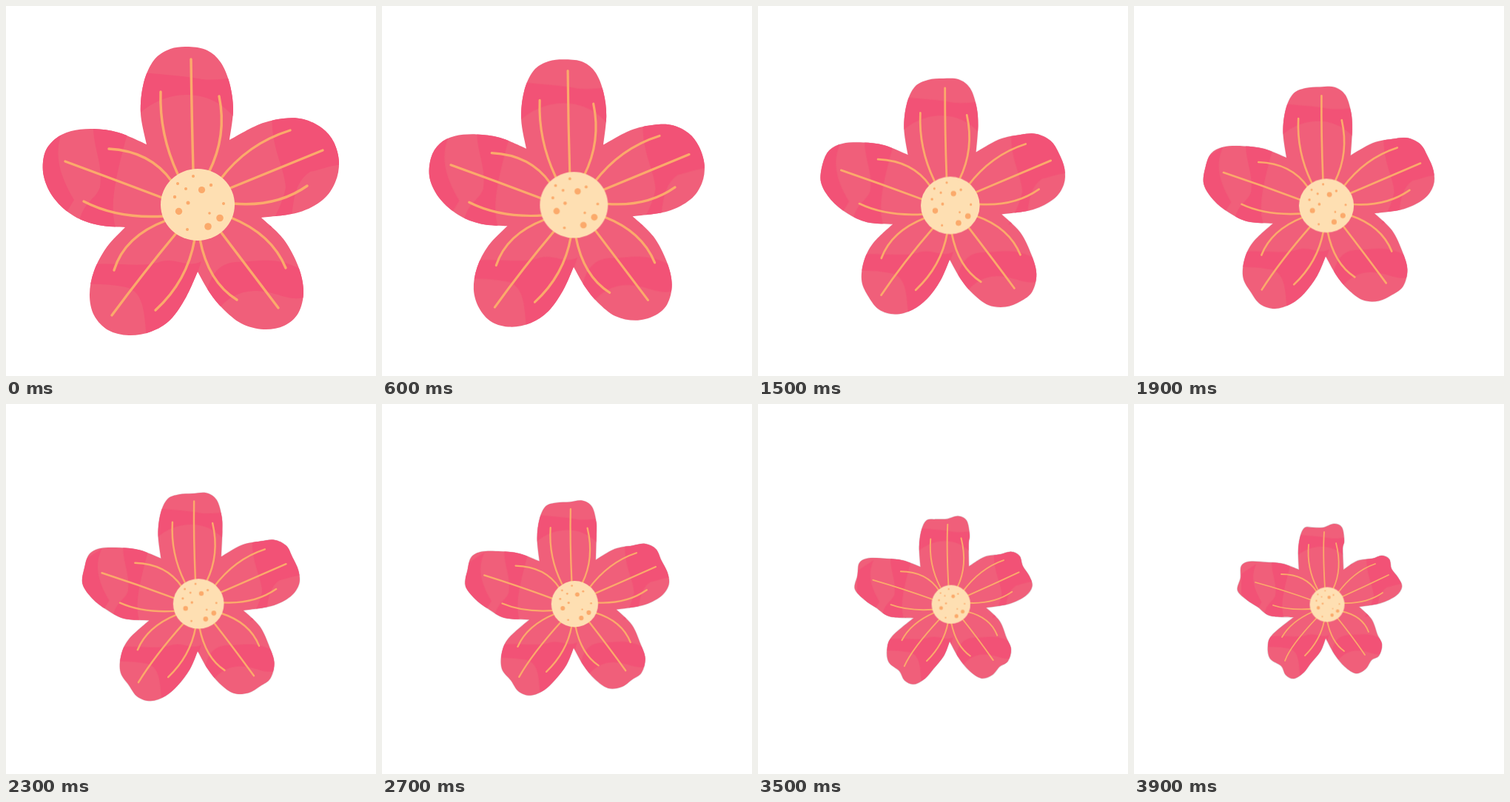
Write an HTML page that moves like this. It is 500x500 px and loops after 4 s.

```html
<!DOCTYPE html>
<html lang="en">
<head>
<meta charset="utf-8">
<title>Shrinking flower</title>
<style>
  html, body { margin: 0; width: 100%; height: 100%; overflow: hidden; background: #fff; }
  svg { display: block; width: 100vw; height: 100vh; }
  #rim { fill: none; stroke: #b98e96; stroke-width: 1.4; }
  #petals { fill: #f05f7a; }
  #patches { fill: #f25276; transform-origin: 259px 268px; }
  #veins { fill: none; stroke: #fbaa6b; stroke-linecap: round; }
  #heart { fill: #fedfb2; transform-origin: 259px 268.5px; }
  #dots { fill: #fbaa6b; }
</style>
</head>
<body>
<svg viewBox="0 0 500 500">
  <clipPath id="clip"><path class="outline"/></clipPath>
  <path id="rim" class="outline"/>
  <path id="petals" class="outline"/>
  <g clip-path="url(#clip)">
    <g id="patches">
      <path d="M170 88C205 93 235 93 265 99Q285 101 320 95V170C292 108 214 104 170 156Z"/>
      <path d="M360 140C356 190 376 215 378 245Q374 268 355 300L386 290C388 255 394 235 411 224C424 222 436 215 460 214V180L430 160Q420 155 415 140Z"/>
      <path d="M270 392C276 362 288 348 310 346C345 346 365 335 410 362V392C380 402 370 385 335 385Q305 386 285 412Z"/>
      <path d="M110 350C145 345 185 355 210 345C232 340 245 355 264 345L235 430L190 450C187 420 188 386 162 380Q135 375 108 376Z"/>
      <path d="M118 155C116 190 132 212 127 245C121 262 104 264 98 295L150 305C137 270 150 225 166 165Z"/>
      <path d="M40 190L78 165C64 196 70 225 92 262L75 290L40 240Z"/>
    </g>
  </g>
  <g id="veins"></g>
  <g id="heart">
    <ellipse cx="259" cy="268.5" rx="50" ry="48.5"/>
    <g id="dots"></g>
  </g>
</svg>
<script>
const NS = 'http://www.w3.org/2000/svg';
const $ = id => document.getElementById(id);

// Each petal: open outline from notch to notch, [full bloom, shrunk].
const petals = [
  ['190 187 182 145 186 104 200 73 222 58 247 55 272 60 290 76 302 104 307 140 302 181',
   '223 224 222 198 225 178 231 167 242 167 256 167 270 162 281 167 284 185 282 195 283 224'],
  ['302 181 342 160 375 152 402 153 427 165 443 184 450 211 445 238 428 262 395 279 345 286',
   '283 224 302 212 322 209 335 205 345 210 348 223 357 235 362 247 354 259 333 269 304 274'],
  ['345 286 375 315 395 352 402 386 395 415 376 432 348 437 318 429 293 409 275 387 259 359',
   '304 274 321 291 329 312 335 325 331 340 321 346 313 358 300 364 285 355 271 338 259 316'],
  ['259 359 243 394 222 424 196 440 166 445 138 438 119 418 113 390 119 358 136 326 161 299',
   '259 316 252 334 239 350 229 363 216 371 205 366 199 354 184 344 181 327 187 312 216 288'],
  ['161 299 125 296 92 284 65 260 51 230 52 200 66 180 88 169 118 166 152 171 190 187',
   '216 288 184 286 167 274 153 265 140 252 144 235 145 219 156 213 180 214 201 216 223 224']
];

// Quadratic veins, tip to base, [full bloom, shrunk].
const veins = [
  ['M209 116Q207 173 232 227', 'M236 190Q233 222 248 250'],
  ['M250 72Q251 150 253 222', 'M257 173Q255 200 258 249'],
  ['M288 122Q299 175 274 225', 'M273 188Q282 223 269 250'],
  ['M384 168Q326 186 289 235', 'M326 216Q297 226 275 256'],
  ['M428 195Q366 220 303 246', 'M344 231Q313 246 280 261'],
  ['M407 243Q366 272 307 267', 'M336 255Q314 270 283 269'],
  ['M378 354Q359 308 304 286', 'M317 308Q309 286 280 280'],
  ['M368 408Q330 358 290 305', 'M312 339Q295 314 274 288'],
  ['M312 397Q273 373 262 315', 'M284 334Q267 322 261 293'],
  ['M202 411Q245 372 255 315', 'M231 340Q252 319 257 293'],
  ['M143 418Q186 360 230 307', 'M204 347Q211 327 247 289'],
  ['M146 357Q160 311 216 290', 'M200 315Q212 294 241 281'],
  ['M105 264Q151 288 214 284', 'M188 272Q209 279 239 277'],
  ['M80 210Q145 234 211 259', 'M164 241Q201 251 240 265'],
  ['M139 193Q195 196 224 237', 'M199 230Q232 230 247 254']
];

const dots = [
  [253, 230, 2], [232, 240, 2], [243, 247, 2], [264.5, 248.5, 4.6], [277, 242, 2.2],
  [228, 258, 2.2], [246, 266, 2.5], [233.5, 277.5, 4.7], [294, 267, 2],
  [275, 280, 1.8], [289, 286.5, 4.8], [273, 298, 4.8], [245, 302, 2]
];

// Catmull-Rom spline as cubic segments.
function spline(text) {
  const n = text.split(' ').map(Number);
  const p = [];
  for (let i = 0; i < n.length; i += 2) p.push([n[i], n[i + 1]]);
  const at = i => p[Math.max(0, Math.min(p.length - 1, i))];
  const handle = (i, from, to) =>
    [0, 1].map(a => (at(i)[a] + (at(to)[a] - at(from)[a]) / 6).toFixed(2));
  let d = '';
  for (let i = 0; i < p.length - 1; i++) {
    d += 'C' + [handle(i, i - 1, i + 1), handle(i + 1, i + 2, i), p[i + 1]].join(' ');
  }
  return d.replace(/,/g, ' ');
}

const outline = pose =>
  'M' + petals[0][pose].split(' ', 2).join(' ') + petals.map(p => spline(p[pose])).join('') + 'Z';

function add(parent, tag, attrs) {
  const el = document.createElementNS(NS, tag);
  for (const k in attrs) el.setAttribute(k, attrs[k]);
  return parent.appendChild(el);
}

// Forty held poses per loop, the first and last included.
const timing = { duration: 4000, iterations: Infinity, easing: 'steps(40, jump-none)' };
const play = (el, frames) => {
  el.animate(frames, timing).startTime = 0;
};
const morph = (el, poses) => {
  el.setAttribute('d', poses[0]);
  play(el, { d: poses.map(d => `path("${d}")`) });
};

const bloom = [outline(0), outline(1)];
document.querySelectorAll('.outline').forEach(el => morph(el, bloom));
veins.forEach(v => morph(add($('veins'), 'path'), v));
dots.forEach(([cx, cy, r]) => add($('dots'), 'circle', { cx, cy, r }));

play($('rim'), { strokeOpacity: [0, 0.5] });
play($('veins'), { strokeWidth: ['3.4px', '1.8px'] });
play($('patches'), { transform: ['translate(0px, 0px) scale(1)', 'translate(2px, 3px) scale(.53)'] });
play($('heart'), { transform: ['translate(0px, 0px) scale(1, 1)', 'translate(2px, 2.5px) scale(.47, .485)'] });
</script>
</body>
</html>
```
